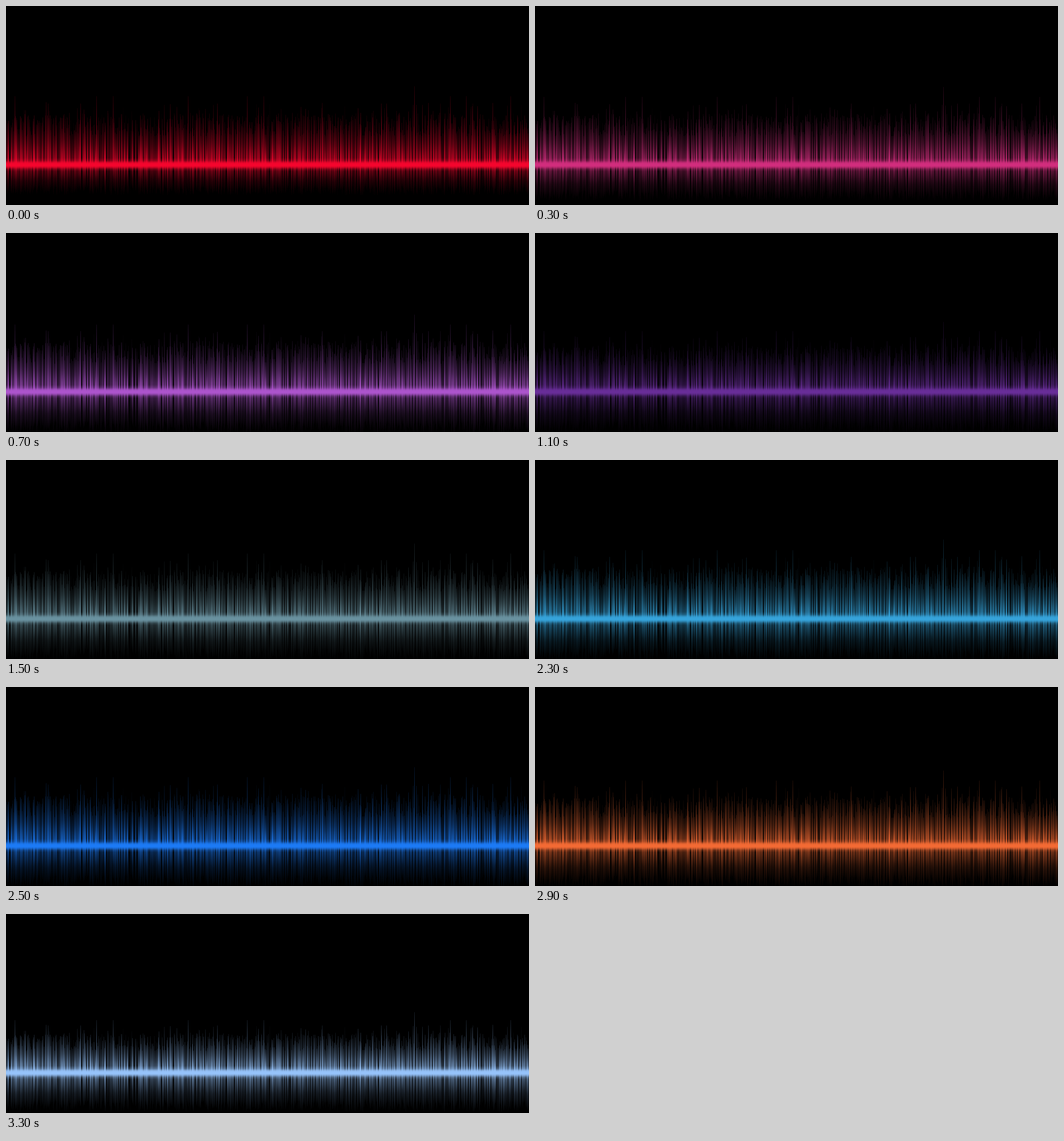
Animation, 788 px wide and 300 px high, one loop 3.5 s. Source, as an HTML page with a canvas:

```html
<!DOCTYPE html>
<html lang="en">
<head>
<meta charset="utf-8">
<title>Spectrum</title>
<style>
  html, body { margin: 0; width: 100%; height: 100%; overflow: hidden; background: #000; }
  canvas { display: block; }
</style>
</head>
<body>
<canvas id="stage" width="788" height="300"></canvas>
<script>
const W = 788, H = 300, LINE = 239, LOOP = 3500;
const ctx = document.getElementById('stage').getContext('2d');

// key poses; the steps between them are blended
const keys = [
  { step: 0, color: [245, 5, 45], peak: 118, depth: 44 },
  { step: 4, color: [172, 84, 204], peak: 116, depth: 60 },
  { step: 6, color: [104, 45, 152], peak: 105, depth: 60 },
  { step: 10, color: [105, 245, 165], peak: 120, depth: 60 },
  { step: 13, color: [28, 122, 245], peak: 118, depth: 60 },
  { step: 15, color: [243, 106, 52], peak: 113, depth: 60 },
  { step: 17, color: [150, 195, 250], peak: 91, depth: 56 }
];

const mix = (a, b, k) => a + (b - a) * k;

function poseAt(step) {
  const next = Math.max(1, keys.findIndex(key => key.step >= step));
  const a = keys[next - 1], b = keys[next];
  const k = (step - a.step) / (b.step - a.step);
  return {
    color: a.color.map((v, i) => Math.round(mix(v, b.color[i], k))),
    peak: mix(a.peak, b.peak, k),
    depth: mix(a.depth, b.depth, k)
  };
}

function seeded(seed) {
  return () => {
    seed = (seed + 0x6D2B79F5) | 0;
    let n = Math.imul(seed ^ (seed >>> 15), seed | 1);
    n ^= n + Math.imul(n ^ (n >>> 7), n | 61);
    return ((n ^ (n >>> 14)) >>> 0) / 4294967296;
  };
}

// heights are fractions of the tallest spike
const TALLEST = 615;
const tall = [13, 136, 161, 274, 363, 388, 669, 693, 760];
const random = seeded(71);
const columns = Array.from({ length: W }, (_, x) => {
  const dark = random() < .2;
  const level = dark ? mix(.08, .3, random()) : mix(.45, 1, random());
  const height = random() < .06 ? mix(.68, .8, random()) : mix(.36, .66, random());
  const reach = mix(.75, 1.05, random());
  if (x === TALLEST) return { level: .8, height: 1, reach };
  if (tall.includes(x)) return { level: .8, height: .87, reach };
  return { level, height, reach };
});

function fade(color, from, to, stops) {
  const gradient = ctx.createLinearGradient(0, from, 0, to);
  for (const [at, alpha] of stops) gradient.addColorStop(at, `rgba(${color},${alpha})`);
  return gradient;
}

// a bar of unit length, stretched away from the line
function bar(x, length, alpha, fill) {
  ctx.setTransform(1, 0, 0, length, x, LINE);
  ctx.globalAlpha = alpha;
  ctx.fillStyle = fill;
  ctx.fillRect(0, 0, 1, 1);
}

function draw({ color, peak, depth }) {
  ctx.fillStyle = '#000';
  ctx.fillRect(0, 0, W, H);

  const above = fade(color, 0, 1, [[0, 1], [.25, .76], [.5, .48], [.75, .29], [1, .12]]);
  const below = fade(color, 0, 1, [[0, .8], [.3, .48], [.6, .2], [1, .02]]);
  columns.forEach(({ level, height, reach }, x) => {
    bar(x, -Math.round(peak * height), level, above);
    bar(x, Math.round(depth * reach), level, below);
  });

  ctx.resetTransform();
  ctx.globalAlpha = 1;
  ctx.fillStyle = fade(color, LINE - 10, LINE + 10,
    [[0, 0], [.2, .25], [.35, .82], [.45, 1], [.6, 1], [.7, .75], [.85, .2], [1, 0]]);
  ctx.fillRect(0, LINE - 10, W, 20);
}

let shown = -1;
function tick() {
  const t = performance.now() % LOOP;
  const step = Math.floor((t + 100) / 200);
  if (step !== shown) draw(poseAt(shown = step));
  requestAnimationFrame(tick);
}
tick();
</script>
</body>
</html>
```
